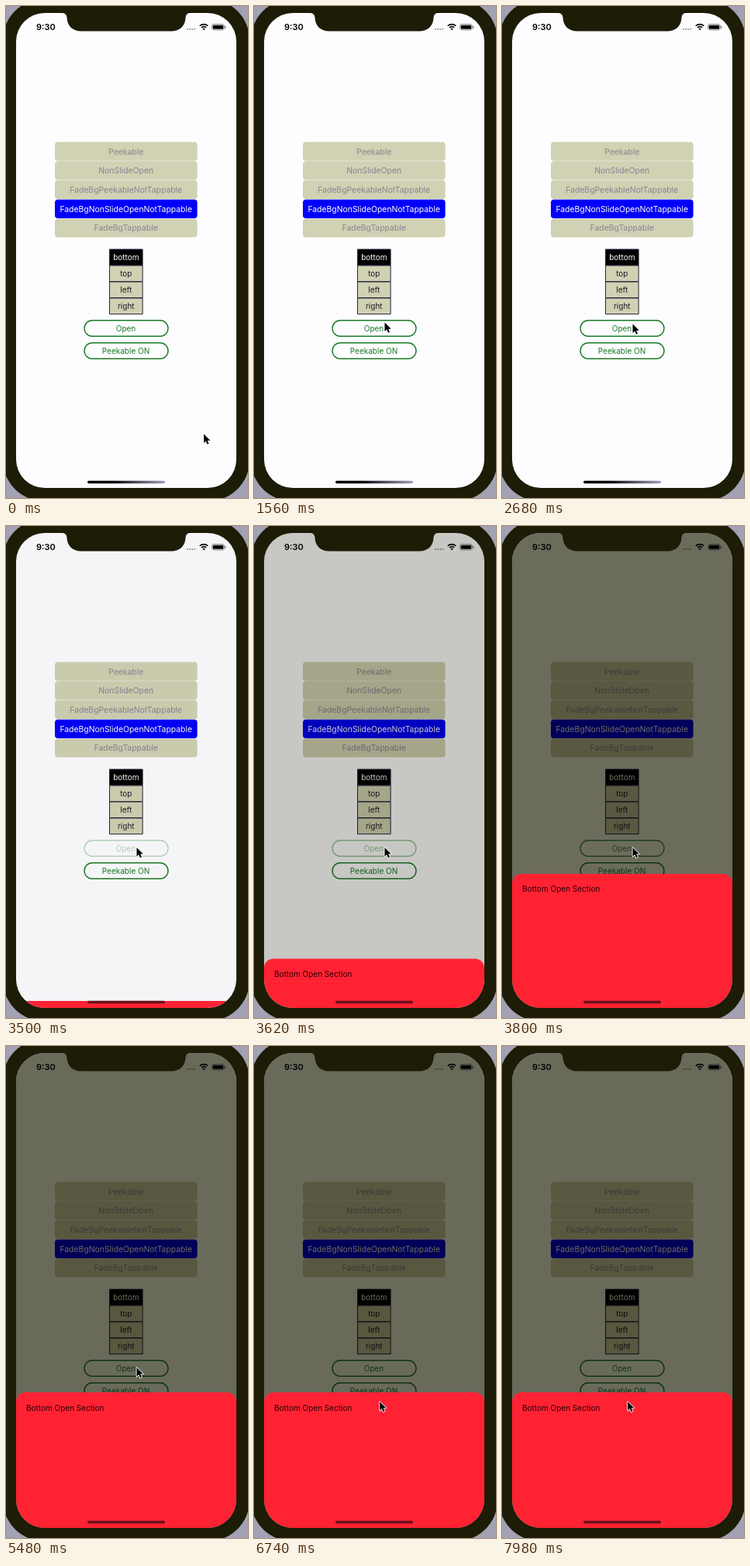
Recreate the animation shown at these times as an HTML page with a canvas. Size 312 px wide and 635 px high, loop 8000 ms.

```html
<!DOCTYPE html>
<html lang="en">
<head>
<meta charset="utf-8">
<title>Bottom drawer demo</title>
<style>
  html, body { margin: 0; width: 100%; height: 100%; overflow: hidden; background: #a2a2b4; }
  canvas { display: block; width: 312px; height: 635px; }
</style>
</head>
<body>
<canvas id="stage"></canvas>
<script>
const W = 312, H = 635, LOOP = 8000;
const SCREEN = { x: 13, y: 9, w: 284, h: 613, r: 37 };
const BODY = '#1c1c07', PAPER = '#fdfdff', FILL = '#d1d1b3', GREEN = '#1b7a26';
const DRAWER_SHUT = 622, DRAWER_OPEN = 447;
const DIM = [107, 107, 91];

const MODES = ['Peekable', 'NonSlideOpen', 'FadeBgPeekableNotTappable',
  'FadeBgNonSlideOpenNotTappable', 'FadeBgTappable'];
const SIDES = ['bottom', 'top', 'left', 'right'];

// Each track is a list of [time, value] points
const SLIDE = [[3420, 0], [3500, .05], [3620, .36], [3800, .989], [3900, 1]];
const PRESS = [[3340, 1], [3430, .22], [3500, .3], [3620, .45], [3800, .8], [3900, 1]];
const MOUSE_X = [[400, 255], [1250, 168.5], [5550, 168.5], [6250, 162]];
const MOUSE_Y = [[400, 552.5], [1250, 408.5], [2500, 408.5], [3000, 415], [5550, 415], [6250, 459]];

const canvas = document.getElementById('stage');
const ctx = canvas.getContext('2d');
const dpr = window.devicePixelRatio || 1;
canvas.width = W * dpr;
canvas.height = H * dpr;

// Monotone cubic interpolation, flat at both ends
function track(points, t) {
  const last = points.length - 1;
  if (t <= points[0][0]) return points[0][1];
  if (t >= points[last][0]) return points[last][1];
  const slope = i => (points[i + 1][1] - points[i][1]) / (points[i + 1][0] - points[i][0]);
  const tangent = i => {
    if (i === 0 || i === last) return 0;
    const a = slope(i - 1), b = slope(i);
    return a * b <= 0 ? 0 : 2 * a * b / (a + b);
  };
  let i = 0;
  while (t > points[i + 1][0]) i++;
  const [t0, v0] = points[i], [t1, v1] = points[i + 1];
  const d = t1 - t0, u = (t - t0) / d, w = 1 - u;
  return v0 * w * w * (1 + 2 * u) + v1 * u * u * (3 - 2 * u)
    + d * u * w * (tangent(i) * w - tangent(i + 1) * u);
}

function box(x, y, w, h, r, fill, stroke, line) {
  ctx.beginPath();
  ctx.roundRect(x, y, w, h, r);
  if (fill) { ctx.fillStyle = fill; ctx.fill(); }
  if (stroke) { ctx.strokeStyle = stroke; ctx.lineWidth = line; ctx.stroke(); }
}

function label(str, x, y, color, size = 10, align = 'center', weight = 400) {
  ctx.font = `${weight} ${size}px Inter, Roboto, sans-serif`;
  ctx.textAlign = align;
  ctx.fillStyle = color;
  ctx.fillText(str, x, y);
}

function drawStatus() {
  label('9:30', 39, 31.3, '#000', 11, 'left', 600);
  ctx.fillStyle = '#9a9a78';
  for (let i = 0; i < 4; i++) ctx.fillRect(233 + i * 3.2, 29, 1.8, 1.8);

  ctx.strokeStyle = '#000';
  ctx.lineWidth = 1.7;
  for (const r of [4.3, 7.4]) {
    ctx.beginPath();
    ctx.arc(255, 31, r, -Math.PI * .75, -Math.PI * .25);
    ctx.stroke();
  }
  ctx.beginPath();
  ctx.moveTo(255, 31.3);
  ctx.arc(255, 31.3, 2.5, -Math.PI * .75, -Math.PI * .25);
  ctx.fillStyle = '#000';
  ctx.fill();

  box(265.5, 23.5, 16, 7.5, 2.3, null, '#77777f', .8);
  box(266.7, 24.7, 13.6, 5.1, 1.2, '#000');
  box(282.4, 25.8, 1.2, 3, .6, '#77777f');
}

function drawPill(str, y, alpha) {
  ctx.globalAlpha = alpha;
  box(101, y, 108, 20.6, 10.3, null, GREEN, 1.4);
  label(str, 154.5, y + 14, GREEN);
  ctx.globalAlpha = 1;
}

function drawPage(t) {
  ctx.fillStyle = PAPER;
  ctx.fillRect(SCREEN.x, SCREEN.y, SCREEN.w, SCREEN.h);
  drawStatus();
  MODES.forEach((name, i) => {
    const on = i === 3, y = 175.6 + i * 24.7;
    box(63, y, 183.6, 24.2, 4, on ? '#0000fa' : FILL);
    label(name, 154.7, y + 16, on ? '#fff' : '#858594', 10.4);
  });
  SIDES.forEach((name, i) => {
    const on = i === 0, y = 314 + i * 21;
    box(133.5, y, 42.6, 20.6, 0, on ? '#000' : FILL, '#25253c', 1);
    label(name, 154.8, y + 14, on ? '#fff' : '#1c1c28');
  });
  drawPill('Open', 405.7, track(PRESS, t));
  drawPill('Peekable ON', 434.7, 1);
}

function drawDrawer(open) {
  if (open <= 0) return;
  ctx.globalCompositeOperation = 'multiply';
  ctx.fillStyle = `rgb(${DIM.map(c => 255 - (255 - c) * open).join()})`;
  ctx.fillRect(SCREEN.x, SCREEN.y, SCREEN.w, SCREEN.h);
  ctx.globalCompositeOperation = 'source-over';
  const y = DRAWER_SHUT + (DRAWER_OPEN - DRAWER_SHUT) * open;
  box(SCREEN.x, y, SCREEN.w, 200, 12, '#ff2233');
  label('Bottom Open Section', 26, y + 23.5, '#2a0006', 10, 'left');
}

function drawHomeBar(open) {
  let color = '#6b101d';
  if (open <= 0) {
    color = ctx.createLinearGradient(105, 0, 205, 0);
    color.addColorStop(0, '#000');
    color.addColorStop(.35, '#08080c');
    color.addColorStop(1, '#a0a0bc');
  }
  box(105, 612.8, 100, 3.4, 1.7, color);
}

function drawNotch() {
  ctx.beginPath();
  ctx.moveTo(70, 8);
  ctx.lineTo(73, 9);
  ctx.quadraticCurveTo(78, 9.5, 78.5, 15);
  ctx.bezierCurveTo(79, 26, 86, 32.5, 97, 32.5);
  ctx.lineTo(213, 32.5);
  ctx.bezierCurveTo(224, 32.5, 231, 26, 231.5, 15);
  ctx.quadraticCurveTo(232, 9.5, 237, 9);
  ctx.lineTo(240, 8);
  ctx.closePath();
  ctx.fillStyle = BODY;
  ctx.fill();
}

function drawMouse(x, y) {
  const outline = [[0, 0], [0, 11.6], [2.7, 9.1], [4.5, 13.2], [6.5, 12.3], [4.7, 8.3], [8.3, 8.3]];
  ctx.beginPath();
  for (const [dx, dy] of outline) ctx.lineTo(x + dx, y + dy);
  ctx.closePath();
  ctx.lineJoin = 'round';
  ctx.lineWidth = 1.6;
  ctx.strokeStyle = '#fff';
  ctx.stroke();
  ctx.fillStyle = '#000';
  ctx.fill();
}

function draw(t) {
  const open = track(SLIDE, t);
  ctx.setTransform(dpr, 0, 0, dpr, 0, 0);
  ctx.fillStyle = '#a2a2b4';
  ctx.fillRect(0, 0, W, H);
  box(-4, -9, 318, 648, 53, BODY);

  ctx.save();
  ctx.beginPath();
  ctx.roundRect(SCREEN.x, SCREEN.y, SCREEN.w, SCREEN.h, SCREEN.r);
  ctx.clip();
  drawPage(t);
  drawDrawer(open);
  drawHomeBar(open);
  ctx.restore();

  drawNotch();
  drawMouse(track(MOUSE_X, t), track(MOUSE_Y, t));
}

const start = performance.now();
function tick() {
  draw((performance.now() - start) % LOOP);
  requestAnimationFrame(tick);
}
tick();
</script>
</body>
</html>
```
